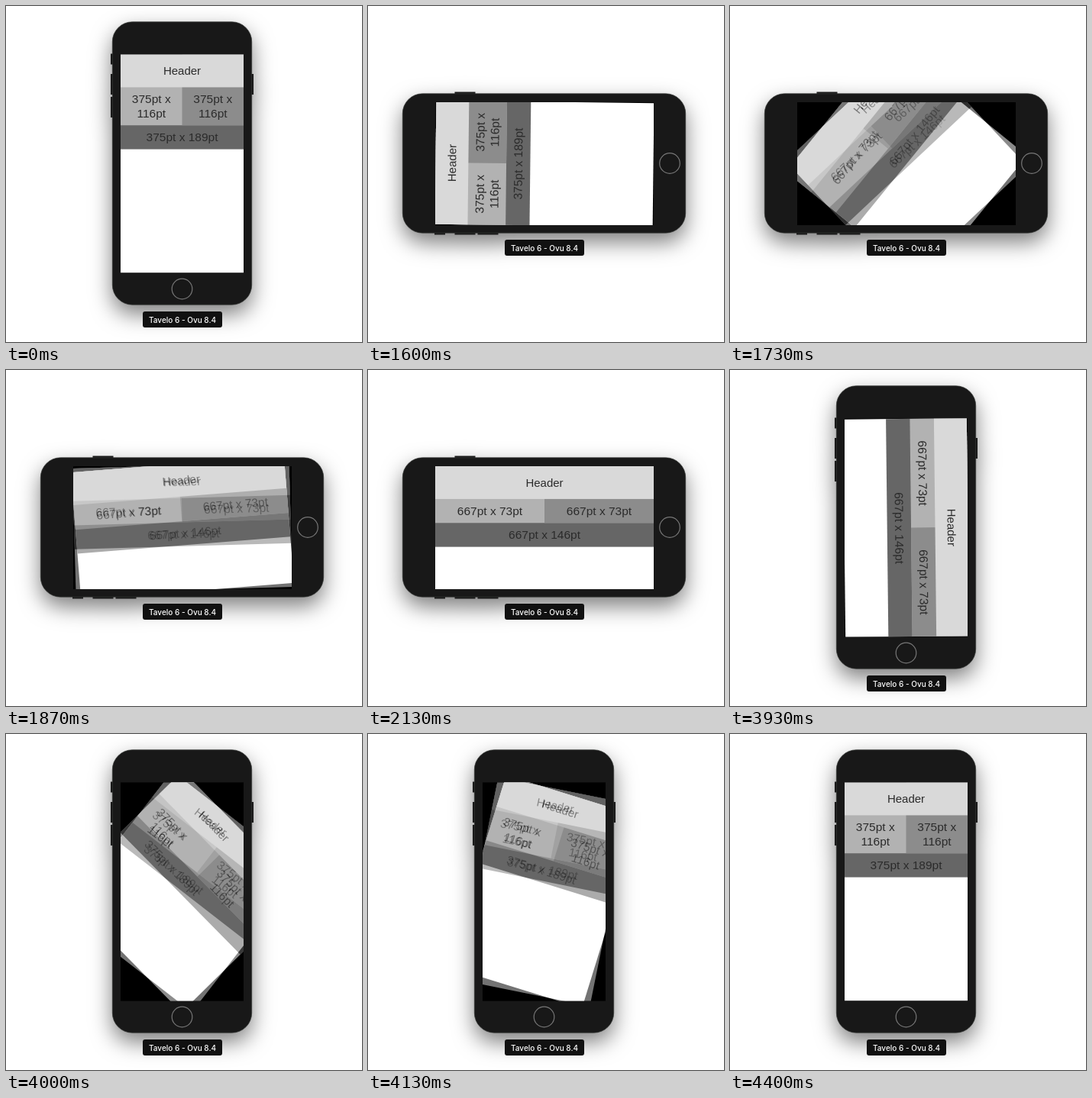
Write an HTML page that moves like this. It is 466 by 440 pixels and loops after 5.73 s.

```html
<!DOCTYPE html>
<html lang="en">
<head>
<meta charset="utf-8">
<title>Rotating phone layout</title>
<style>
  html, body { margin: 0; width: 100%; height: 100%; overflow: hidden; background: #fff; }
  svg { display: block; }
  text { text-anchor: middle; font-family: "Liberation Sans", Arial, sans-serif; fill: #2b2b2b; }
  #shadow { filter: drop-shadow(0 12px 14px rgba(0, 0, 0, .5)); }
  #badge text { font: 500 10px Inter, sans-serif; fill: #fff; }
</style>
</head>
<body>
<svg width="466" height="440" viewBox="0 0 466 440">
  <clipPath id="window"><rect id="windowRect"/></clipPath>
  <g id="shadow">
    <g id="device" fill="#181818">
      <rect x="-93.5" y="-143.5" width="4" height="14"/>
      <rect x="-93.5" y="-117" width="4" height="27"/>
      <rect x="-93.5" y="-87" width="4" height="27"/>
      <rect x="89.5" y="-117" width="4" height="27"/>
      <rect x="-91.2" y="-185.2" width="182.4" height="370.4" rx="26" stroke="#363936" stroke-width=".7"/>
      <circle cy="164.5" r="13.3" fill="none" stroke="#777" stroke-width="1.2"/>
    </g>
  </g>
  <g id="screen" clip-path="url(#window)"></g>
  <g id="badge">
    <rect x="179" y="400" width="104" height="21" rx="3" fill="#111"/>
    <text x="231" y="414.5">Tavelo 6 - Ovu 8.4</text>
  </g>
</svg>
<script>
const LOOP = 5730, TURN = 300, TICK = 66.7;
const SCALE = 161 / 375, HEADER = 100 * SCALE, FOOTER = 73 * SCALE;
const layouts = {
  portrait: { w: 161, h: 286, row: 116 * SCALE, cell: ["375pt x", "116pt"], footer: "375pt x 189pt" },
  landscape: { w: 286, h: 161, row: 73 * SCALE, cell: ["667pt x 73pt"], footer: "667pt x 146pt" }
};
const turns = [
  { start: 1600, from: "portrait", to: "landscape", angle: -90, pace: 61 },
  { start: 3870, from: "landscape", to: "portrait", angle: 90, pace: 67 }
];
const find = id => document.getElementById(id);
const mix = (a, b, p) => a + (b - a) * p;
const ease = x => x * x * (3 - 2 * x);

const rect = (x, y, w, h, fill) =>
  `<rect x="${x}" y="${y}" width="${w}" height="${h}" fill="${fill}"/>`;

const label = (lines, x, y, size = 15.5) => lines.map((line, i) =>
  `<text x="${x}" y="${y + 5.3 + 19 * (i - (lines.length - 1) / 2)}" font-size="${size}">${line}</text>`
).join("");

// Bounds are interpolated, while each label keeps its own layout's size, anchored top left.
function page(from, to, texts, p, angle, opacity) {
  const w = mix(from.w, to.w, p), h = mix(from.h, to.h, p), row = mix(from.row, to.row, p);
  const left = -w / 2, top = -h / 2, rowTop = top + HEADER, footerTop = rowTop + row;
  const cellY = rowTop + texts.row / 2, mid = left + texts.w / 2;
  return `<g opacity="${opacity}">${rect(0, 0, 466, 440, "#000")}
    <g transform="translate(${center(to)} 206.5) rotate(${angle * (1 - p)})">
    ${rect(left, top, w, h, "#fff")}
    ${rect(left, top, w, HEADER + row + FOOTER, "#666")}
    ${rect(left, top, w, HEADER + row, "#b2b2b2")}
    ${rect(0, top, w / 2, HEADER + row, "#8c8c8c")}
    ${rect(left, top, w, HEADER, "#d9d9d9")}
    ${label(["Header"], mid, top + HEADER / 2, 15)}
    ${label(texts.cell, left + texts.w / 4, cellY)}
    ${label(texts.cell, texts.w / 4, cellY)}
    ${label([texts.footer], mid, footerTop + FOOTER / 2)}
    </g></g>`;
}

function center(layout) {
  return layout === layouts.landscape ? 231 : 230.5;
}

function draw(turn, step) {
  const from = layouts[turn.from], to = layouts[turn.to];
  const elapsed = 15 + step * turn.pace;
  const progress = ms => ease(Math.min(1, ms / TURN));
  const texts = step === 0 ? from : to;
  let content = page(from, to, texts, progress(elapsed), turn.angle, 1);
  // Moving steps blend with the next display refresh.
  if (step > 0 && elapsed < TURN)
    content += page(from, to, texts, progress(elapsed + 17), turn.angle, .45);
  find("screen").innerHTML = content;

  const wide = to === layouts.landscape;
  find("device").setAttribute("transform", `translate(230.5 206) rotate(${wide ? -90 : 0})`);
  find("badge").setAttribute("transform", `translate(0 ${wide ? -94 : 0})`);
  const box = { x: center(to) - to.w / 2, y: 206.5 - to.h / 2, width: to.w, height: to.h };
  for (const key in box) find("windowRect").setAttribute(key, box[key]);
}

let shown = "";
function frame(now) {
  const t = now % LOOP;
  const turn = t >= turns[0].start && t < turns[1].start ? turns[0] : turns[1];
  const since = (t - turn.start + LOOP) % LOOP;
  const step = Math.min(6, Math.floor(since / TICK + .06));
  const state = turn.to + step;
  if (state !== shown) draw(turn, step);
  shown = state;
  requestAnimationFrame(frame);
}
frame(0);
</script>
</body>
</html>
```
